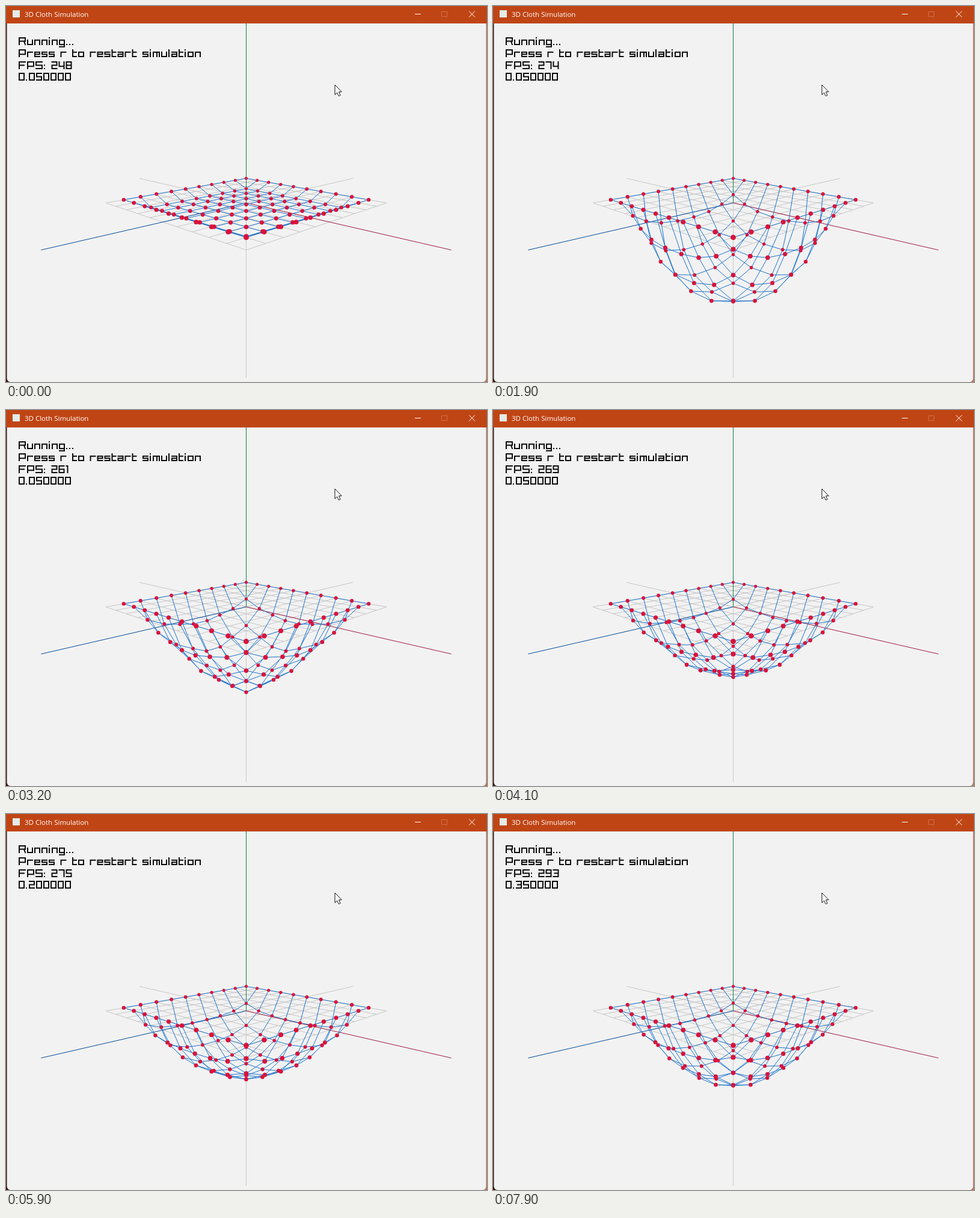
These frames come from a looping animation (800x625 px, 8 s). An HTML page with a canvas:

```html
<!DOCTYPE html>
<html lang="en">
<head>
<meta charset="utf-8">
<title>3D Cloth Simulation</title>
<style>
html, body { margin: 0; width: 100%; height: 100%; overflow: hidden; background: #f2f2f2; }
canvas { display: block; }
</style>
</head>
<body>
<canvas id="stage" width="800" height="625" aria-label="3D cloth simulation"></canvas>
<script>
const ctx = document.getElementById('stage').getContext('2d');
const LOOP = 8000, STEP = 100;

// Camera at (15, 5, 15), looking at the origin
const DIST = Math.sqrt(475), SIN = 5 / DIST, COS = Math.sqrt(450) / DIST, FOCAL = 719.6;

function project(x, y, z) {
  const u = (x - z) / Math.SQRT2, v = (x + z) / Math.SQRT2;
  const scale = FOCAL / (DIST - v * COS - y * SIN);
  return { x: 399.5 + u * scale, y: 327.3 - (y * COS - v * SIN) * scale, scale };
}

// Each pose: time in s; depths, then outward shifts, along the diagonal
// from rim to centre; exponent of the mean that fills in the other nodes
const poses = [
  [0, .41, .42, .42, .42, .01, .01, 0, 0, -1],
  [.5, .9, 1.32, 1.38, 1.38, .14, .06, 0, 0, -1],
  [1.1, .93, 2.37, 3.2, 3.25, .346, .41, .057, .07, -.8],
  [1.9, .86, 2.36, 4.16, 5.17, .219, .58, .728, .325, -.4],
  [3.2, .86, 2.22, 3.4, 4.6, .156, .127, 0, .04, -.4],
  [5.1, .934, 2.07, 2.78, 3.03, .269, .346, .141, .089, -1],
  [6.7, .88, 2.03, 3.21, 3.96, .18, .32, .33, .15, -.95],
  [7.9, .88, 2.03, 3.2, 3.94, .18, .32, .33, .15, -.95]
];

function slope(i, c) {
  const a = poses[Math.max(i - 1, 0)], b = poses[Math.min(i + 1, poses.length - 1)];
  return (b[c] - a[c]) / (b[0] - a[0]);
}

function poseValue(t, c) {
  let i = 0;
  while (i < poses.length - 2 && t >= poses[i + 1][0]) i++;
  const a = poses[i], b = poses[i + 1], span = b[0] - a[0];
  const s = (t - a[0]) / span, s2 = s * s, s3 = s2 * s;
  return a[c] * (2 * s3 - 3 * s2 + 1) + b[c] * (3 * s2 - 2 * s3)
    + span * (slope(i, c) * (s3 - 2 * s2 + s) + slope(i + 1, c) * (s3 - s2));
}

function clothPoints(t) {
  const depth = [0], spread = [0], power = poseValue(t, 9);
  for (let k = 1; k <= 4; k++) {
    depth[k] = poseValue(t, k);
    spread[k] = poseValue(t, k + 4) / depth[k];
  }
  const points = [];
  for (let i = 0; i < 10; i++) {
    for (let j = 0; j < 10; j++) {
      const p = i - 4.5, q = j - 4.5;
      const a = 4.5 - Math.abs(p), b = 4.5 - Math.abs(q);
      const sag = ((depth[a] ** power + depth[b] ** power) / 2) ** (1 / power);
      const x = p + Math.sign(p) * spread[a] * sag;
      const z = q + Math.sign(q) * spread[b] * sag;
      points.push(project(x - .5, -sag, z - .5));
    }
  }
  return points;
}

function segment(a, b) {
  ctx.moveTo(a.x, a.y);
  ctx.lineTo(b.x, b.y);
}

function strokePath(color, width, build) {
  ctx.strokeStyle = color;
  ctx.lineWidth = width;
  ctx.beginPath();
  build();
  ctx.stroke();
}

function drawGround() {
  const origin = project(0, 0, 0);
  strokePath('#c6c6c6', 1, () => {
    for (let n = -5; n <= 5; n++) {
      segment(project(n, 0, -5), project(n, 0, 5));
      segment(project(-5, 0, n), project(5, 0, n));
    }
    segment(origin, project(-10, 0, 0));
    segment(origin, project(0, -10, 0));
    segment(origin, project(0, 0, -10));
  });
  strokePath('#a01840', 1, () => segment(origin, project(10, 0, 0)));
  strokePath('#0f7f3c', 1, () => segment(origin, project(0, 10, 0)));
  strokePath('#004a98', 1, () => segment(origin, project(0, 0, 10)));
}

function drawCloth(t) {
  const points = clothPoints(t);
  strokePath('#1972cc', 1, () => {
    points.forEach((p, n) => {
      if (n % 10 < 9) segment(p, points[n + 1]);
      if (n < 90) segment(p, points[n + 10]);
    });
  });
  ctx.fillStyle = '#d8143c';
  for (const p of points) {
    ctx.beginPath();
    ctx.arc(p.x, p.y, p.scale * .1, 0, 7);
    ctx.fill();
  }
}

// Square stroke font: digit pairs are x and y, spaces separate strokes
const glyphs = {
  R: '0600505303 4356', P: '0600505404', F: '060050 0343', S: '500003535606',
  a: '024246060444', e: '460602424404', g: '460602424808', i: '0206 0000',
  l: '0006', m: '06025256 3236', n: '06024246', o: '0602424606', r: '060242',
  s: '420204444606', t: '000636 0232', u: '02064642', '.': '0606', ':': '0303 0606',
  0: '0600404606', 1: '001016', 2: '004043030646', 3: '00404606 1343',
  4: '000444 4046', 5: '400003434606', 6: '400006464303', 7: '004046',
  8: '0600404606 0343', 9: '430300404606'
};

function drawText(text, x, y) {
  ctx.lineCap = 'square';
  strokePath('#0c0c0c', 2, () => {
    for (const char of text) {
      if (char === ' ') { x += 7.5; continue; }
      let right = 0;
      for (const stroke of glyphs[char].split(' ')) {
        stroke.match(/../g).forEach(([gx, gy], n) => {
          right = Math.max(right, +gx);
          const px = x + 1 + gx * 2, py = y + gy * 1.83;
          if (n) ctx.lineTo(px, py);
          else ctx.moveTo(px - .01, py);
        });
        if (stroke.length === 2) continue;
      }
      x += right ? right * 2 + 4 : 5;
    }
  });
  ctx.lineCap = 'butt';
}

const rates = [248, 252, 257, 274, 268, 265, 261, 264, 269, 270, 272, 275, 278, 281, 288, 293];
const dampingSteps = [4600, 5500, 5900, 6300, 7300, 7600];

function drawStatus(ms) {
  const damping = .05 * (1 + dampingSteps.filter(at => ms >= at).length);
  drawText('Running...', 21, 53);
  drawText('Press r to restart simulation', 21, 73);
  drawText('FPS: ' + rates[Math.floor(ms / 500)], 21, 93);
  drawText(damping.toFixed(6), 21, 112);
}

function drawBackdrop() {
  ctx.fillStyle = '#3c1710';
  ctx.fillRect(0, 0, 400, 625);
  ctx.fillStyle = '#b8735a';
  ctx.fillRect(400, 0, 400, 625);
  ctx.fillStyle = '#f2f2f2';
  ctx.beginPath();
  ctx.roundRect(1.5, 0, 797, 625, 6);
  ctx.fill();
}

function drawTitleBar() {
  ctx.fillStyle = '#c04515';
  ctx.fillRect(0, 0, 800, 29);
  ctx.fillStyle = '#e4ece8';
  ctx.fillRect(11, 7, 12, 12);
  ctx.fillStyle = '#fff';
  ctx.font = '11.5px "Open Sans", "Noto Sans", sans-serif';
  ctx.fillText('3D Cloth Simulation', 31, 18);

  strokePath('#fff', 1, () => {
    ctx.moveTo(680, 13.5);
    ctx.lineTo(690, 13.5);
    ctx.moveTo(770, 8.5);
    ctx.lineTo(780, 18.5);
    ctx.moveTo(780, 8.5);
    ctx.lineTo(770, 18.5);
  });
  strokePath('#d0704c', 1, () => ctx.rect(724.5, 9.5, 9, 8));
}

function drawCursor() {
  const outline = new Path2D('M547 131V147.5L550.7 144L553.4 149.7L556.2 148.5L553.6 142.8H558.3Z');
  ctx.fillStyle = '#fff';
  ctx.fill(outline);
  ctx.strokeStyle = '#111';
  ctx.lineWidth = 1;
  ctx.stroke(outline);
}

const start = performance.now();

function frame() {
  const elapsed = (performance.now() - start) % LOOP;
  const ms = Math.floor(elapsed / STEP) * STEP;
  drawBackdrop();
  drawGround();
  drawCloth(ms / 1000);
  drawStatus(ms);
  drawTitleBar();
  drawCursor();
  requestAnimationFrame(frame);
}
frame();
</script>
</body>
</html>
```
